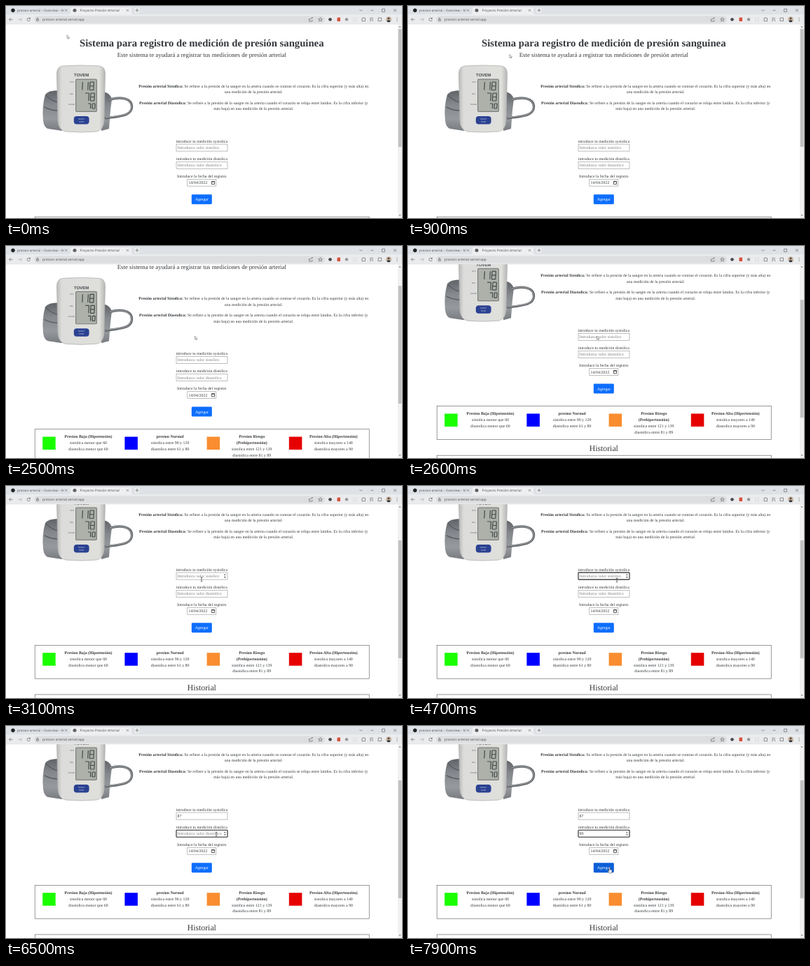
An HTML page that plays this animation: 565x304 px, repeating every 8 s.

```html
<!DOCTYPE html>
<html lang="es">
<head>
<meta charset="utf-8">
<title>Proyecto Presión Arterial</title>
<style>
html, body { margin: 0; width: 100%; height: 100%; overflow: hidden; background: #fff; }
svg { display: block; width: 100vw; height: 100vh; }
text { text-rendering: geometricPrecision; }
.page text { font: 5.885px "Liberation Serif", serif; fill: #34383c; }
.page .h1 { font-size: 14.71px; font-weight: bold; }
.page .h2 { font-size: 11.77px; }
.page .h3 { font-size: 8.83px; }
.page .b, .page .b tspan { font-weight: bold; }
.page .hint { fill: #808080; }
.page .white { fill: #fff; }
.page .tiny { font: 2.8px "Liberation Sans", sans-serif; fill: #556; }
.page .white.tiny { fill: #dde; }
.page .brand { font: bold 6px "Liberation Sans", sans-serif; fill: #44474b; }
.ui text { font: 4.85px "Noto Sans", sans-serif; fill: #55585c; }
.ui .tab { font-size: 4.6px; }
.ui path { fill: none; stroke: #6c6f73; stroke-width: .75; }
</style>
</head>
<body>
<svg viewBox="0 0 565 304" preserveAspectRatio="none">
  <defs>
    <clipPath id="view"><path d="M0 26H565V304H0z"/></clipPath>
    <linearGradient id="shell"><stop stop-color="#b9bab9"/><stop offset=".1" stop-color="#dcdcda"/><stop offset=".88" stop-color="#dfdfdc"/><stop offset="1" stop-color="#b4b5b4"/></linearGradient>
    <linearGradient id="cuff" x2="0" y2="1"><stop stop-color="#5f6266"/><stop offset=".35" stop-color="#85888d"/><stop offset=".7" stop-color="#96999d"/><stop offset="1" stop-color="#777a7f"/></linearGradient>
  </defs>
  <rect width="565" height="304" fill="#fff"/>
  <g clip-path="url(#view)"><g class="page" id="page">
    <g id="device">
      <path d="M75 121Q60 121 56 127Q51 144 53 164Q54 174 60 176L80 179Z" fill="url(#cuff)"/>
      <path d="M57 128Q66 137 75 138M55 145Q64 150 75 150" fill="none" stroke="#5c5f64" stroke-width="1.5"/>
      <path d="M138 123Q148 124 151 133L149 150 147 176 136 179Z" fill="url(#cuff)"/>
      <path d="M146 135C163 129 180 132 179.500 145S162 158 141 161" fill="none" stroke="#6a6d70" stroke-width="3.4"/>
      <path d="M147 134.500C163 129 179 132 178.800 145S162 157 142 160" fill="none" stroke="#a2a4a6" stroke-width="1"/>
      <path d="M81 86Q107 84 133 86Q141 87 141.500 96L140 165Q139 178 129 180Q107 182 85 180Q75 178 74 165L72.500 96Q73 87 81 86Z" fill="url(#shell)" stroke="#b0b1b0" stroke-width=".8"/>
      <text class="brand" x="107.700" y="101.300" text-anchor="middle">TOVEM</text>
      <rect x="99" y="104.500" width="31" height="47.500" rx="2" fill="#7d817f"/>
      <rect x="100.200" y="105.700" width="28.600" height="45.100" rx="1" fill="#adb1aa"/>
      <text class="tiny" x="91" y="110">SYS</text><text class="tiny" x="91" y="127">DIA</text><text class="tiny" x="89" y="142">PULSE</text>
      <rect x="96.800" y="158" width="21.800" height="11.500" rx="4" fill="#2b4292"/>
      <text class="tiny white" x="107.700" y="163" text-anchor="middle">START</text>
      <text class="tiny white" x="107.700" y="166.500" text-anchor="middle">STOP</text>
    </g>
  </g></g>
  <g class="ui" id="ui">
    <rect width="565" height="12.500" fill="#dee1e6"/>
    <path d="M90 12.500Q92 12 92 9V4Q92 2 94 2H177Q179 2 179 4V9Q179 12 181 12.500Z" style="fill:#eeeff0;stroke:none"/>
    <rect y="12.500" width="565" height="13.500" fill="#eaebec"/>
    <path d="M0 26H565" style="stroke:#dcdee1;stroke-width:.6"/>
    <rect x="40" y="14.200" width="415" height="10.300" rx="5.100" fill="#dddedf"/>
    <circle cx="10" cy="6.300" r="2.700" fill="#222"/>
    <circle cx="98" cy="6.300" r="2.500" fill="#5f6368"/>
    <circle cx="187" cy="6.300" r="4.300" fill="#eceded"/>
    <text class="tab" x="16" y="8">presion-arterial – Overview – N</text>
    <text x="105.500" y="8">Proyecto Presión Arterial</text>
    <text x="52" y="21">presion-arterial.vercel.app</text>
    <path d="M84 4.700l3 3m0-3l-3 3M172 4.700l3 3m0-3l-3 3M184.500 6.200h5m-2.500-2.500v5M504.500 5.200l2 2 2-2M520.500 6.200h4M536.500 4.200h4v4h-4zM553 4.200l4 4m0-4l-4 4"/>
    <path d="M9.500 19.300h-5m2.200-2.200l-2.200 2.200 2.200 2.200M34 17.800a2.300 2.300 0 1 0 .5 2.200m0-3.500v2h-2"/>
    <path d="M17.500 19.300h5m-2.200-2.200l2.200 2.200-2.200 2.200" style="stroke:#a9abad"/>
    <path d="M43.700 19h2.600v2.300h-2.600zM44.200 19v-1a.8.8 0 0 1 1.600 0v1M432.500 18v4h4.500v-2M434 20q0-3 3.500-3l-1-1m1 1l-1 1M448.500 16.500l.8 1.900 2 .2-1.500 1.300.5 2-1.800-1.100-1.800 1.100.5-2-1.500-1.300 2-.2z"/>
    <circle cx="462.500" cy="19.300" r="2.400" fill="#4a4e55"/>
    <rect x="472.500" y="16.500" width="4.500" height="5.500" fill="#d5533f"/>
    <circle cx="486" cy="19.300" r="2.200" fill="#94979b"/>
    <path d="M495.500 17h4.500v4.500h-4.500z" style="stroke:#d5d6d8"/>
    <path d="M508 17.500h1.200a1 1 0 0 1 2 0h1.300v4.200h-4.500zM519 17.300h5m-5 2h3m-3 2h2M523.300 19v3M531 17h4.500v4.500h-4.500z"/>
    <circle cx="546" cy="19.300" r="4" fill="#c6b7a5"/>
    <circle cx="546" cy="17.700" r="1.500" fill="#5e4638"/>
    <path d="M543.300 22q2.700-4.200 5.400 0a4 4 0 0 1-5.400 0" style="fill:#34383f;stroke:none"/>
    <path d="M558 16.700v1m0 1.100v1m0 1.100v1" style="stroke-width:1"/>
  </g>
  <rect x="559" y="26" width="6" height="278" fill="#f1f1f1"/>
  <path d="M560.500 30.500l1.500-1.800 1.500 1.800zM560.500 299.500l1.500 1.800 1.500-1.800z" fill="#707070"/>
  <rect id="thumb" x="559.700" width="4.800" height="169" fill="#c1c1c1"/>
  <g stroke-width=".5" stroke-linejoin="round">
    <path id="arrow" d="M0 0V5L1.200 4 2 5.800 2.800 5.400 2 3.700H3.600Z" fill="#fff" stroke="#555"/>
    <path id="beam" d="M-1.300-3Q0-3 0-2.300Q0-3 1.300-3M0-2.300V2.300M-1.300 3Q0 3 0 2.300Q0 3 1.300 3" fill="none" stroke="#333" stroke-width=".7"/>
    <path id="hand" d="M-.7 3V-2.500Q0-3.500.7-2.500V0L3 .6Q3.800 1 3.500 2.200L2.800 5H-.5L-2.700 2Q-2.400.8-.7 2.200" fill="#fff" stroke="#333"/>
  </g>
</svg>
<script>
const LOOP = 8000, SCROLL = 74;
const $ = id => document.getElementById(id);
const page = $('page');

function add(tag, attrs, parent = page) {
  const el = document.createElementNS('http://www.w3.org/2000/svg', tag);
  for (const k in attrs) el.setAttribute(k, attrs[k]);
  return parent.appendChild(el);
}
function label(x, y, str, cls = '', anchor = 'middle') {
  const el = add('text', { x, y, class: cls, 'text-anchor': anchor });
  el.textContent = str;
  return el;
}
const BORDER = '#929292';
const box = (x, y, width, height, stroke = BORDER) =>
  add('rect', { x, y, width, height, fill: '#fff', stroke, 'stroke-width': .6 });

// Seven-segment digits of the monitor: bits run a to g
function digits(str, x, y, w, h) {
  const codes = { 0: 63, 1: 6, 7: 7, 8: 127 };
  const m = h / 2;
  const segs = [`M0 0H${w}`, `M${w} 0V${m}`, `M${w} ${m}V${h}`, `M0 ${h}H${w}`, `M0 ${m}V${h}`, `M0 0V${m}`, `M0 ${m}H${w}`];
  [...str].forEach((c, i) => add('path', {
    d: segs.filter((s, n) => codes[c] >> n & 1).join(''), fill: 'none', stroke: '#454a4b', 'stroke-width': 1.2,
    transform: `translate(${x + i * (w + 2.6)} ${y}) skewX(-3)`
  }, $('device')));
}
digits('118', 104, 109, 5.4, 11.5);
digits('78', 113, 125, 5.4, 11);
digits('70', 117, 140, 3.8, 7);

label(279.3, 58, 'Sistema para registro de medición de presión sanguinea', 'h1');
label(279.3, 73, 'Este sistema te ayudará a registrar tus mediciones de presión arterial', 'h3');

function definition(y, term, first, second) {
  const el = label(353.3, y, '');
  const bold = add('tspan', { 'font-weight': 'bold' }, el);
  bold.textContent = term;
  el.append(' ' + first);
  label(353.3, y + 8.8, second);
}
definition(116.6, 'Presión arterial Sistolica:',
  'Se refiere a la presión de la sangre en la arteria cuando se contrae el corazón. Es la cifra superior (y más alta) en',
  'una medición de la presión arterial.');
definition(140.5, 'Presión arterial Diastolica:',
  'Se refiere a la presión de la sangre en la arteria cuando el corazón se relaja entre latidos. Es la cifra inferior (y',
  'más baja) en una medición de la presión arterial.');

function field(y, title, hint) {
  label(279.3, y - 2.4, title);
  const frame = box(243, y, 73, 10);
  const text = label(244.6, y + 6.9, hint, 'hint', 'start');
  const spin = add('path', { d: `M310.800 ${y + 4}l1.500-1.800 1.500 1.800zM310.800 ${y + 6}l1.500 1.800 1.500-1.800z`, fill: '#555' });
  return (value, focus, hover) => {
    text.textContent = value || hint;
    text.setAttribute('class', value ? '' : 'hint');
    frame.setAttribute('stroke', focus ? '#222' : BORDER);
    frame.setAttribute('stroke-width', focus ? 1.1 : .6);
    frame.setAttribute('rx', focus ? .8 : 0);
    spin.style.display = focus || hover ? '' : 'none';
  };
}
const systolic = field(198.1, 'introduce tu medición systolica', 'Introduzca valor sistolico');
const diastolic = field(223.3, 'introduce tu medición distolica', 'Introduzca valor diastolico');

label(279.3, 245.7, 'Introduce la fecha del registro');
box(258.8, 248.4, 41, 9.8);
label(260.6, 255.4, '14/04/2022', '', 'start');
add('path', { d: 'M293.500 251.300h4v4.300h-4zM293.500 252h4', fill: 'none', stroke: '#333', 'stroke-width': .8 });

const button = add('rect', { x: 264.8, y: 270.2, width: 29, height: 14, rx: 1.4 });
label(279.3, 279.3, 'Agregar', 'white');

box(41.2, 302.4, 477, 47.8, '#555');
const levels = [
  ['#1aff00', 'Presion Baja (Hipotensión)', 'sistolica menor que 60', 'diastolica menor que 60'],
  ['#0000ff', 'presion Normal', 'sistolica entre 90 y 120', 'diastolica entre 61 y 80'],
  ['#f98d2f', 'Presion Riesgo', '(Prehipertensión)', 'sistolica entre 121 y 139', 'diastolica entre 81 y 89'],
  ['#e60000', 'Presion Alta (Hipertensión)', 'sistolica mayores a 140', 'diastolica mayores a 90']
];
levels.forEach(([fill, ...rows], i) => {
  const x = 52.2 + i * 117.2;
  add('rect', { x, y: 313.2, width: 18.5, height: 18.5, fill });
  rows.forEach((row, n) => label(117.5 + i * 116.6, 315 + n * 8.83, row, n < rows.length - 2 ? 'b' : ''));
});
label(279.3, 367, 'Historial', 'h2');
box(41.2, 373, 477, 60, '#555');

// Cursor stops: time, x, y
const stops = [
  [0, 87, 41.5], [300, 87, 41.5], [1900, 269.5, 129], [2700, 269.5, 129], [3000, 279, 134],
  [3600, 279, 134], [4200, 298, 135], [5700, 298, 135], [6100, 300, 155], [7200, 300, 155], [7600, 287.5, 206], [LOOP, 287.5, 206]
];
const smooth = (t, a, b) => {
  const u = Math.min(1, Math.max(0, (t - a) / (b - a)));
  return u * u * (3 - 2 * u);
};
function cursorAt(t) {
  const i = stops.findIndex(s => s[0] > t);
  const [a, x0, y0] = stops[i - 1], [b, x1, y1] = stops[i];
  const u = smooth(t, a, b);
  return [x0 + (x1 - x0) * u, y0 + (y1 - y0) * u];
}
const typed = (t, str, start, gap) => str.slice(0, t < start ? 0 : 1 + Math.floor((t - start) / gap));

function draw(t) {
  const scroll = SCROLL * smooth(t, 2370, 2620);
  page.setAttribute('transform', `translate(0 ${-scroll})`);
  $('thumb').setAttribute('y', 33 + scroll * .608);

  const [x, y] = cursorAt(t);
  const inside = (l, top, r, bottom) => x > l && x < r && y + scroll > top && y + scroll < bottom;
  // Hover follows the pointer only once the page has come to rest
  const resting = t > 2700;
  const over1 = resting && inside(270, 198, 316, 210), over2 = inside(243, 223, 316, 234);
  const overButton = inside(264, 270, 294, 284);
  systolic(typed(t, '87', 5200, 200), t >= 3400 && t < 6200, over1);
  diastolic(typed(t, '90', 6800, 200), t >= 6200, over2);
  button.setAttribute('fill', overButton ? '#0b5ed7' : '#0d6efd');

  const shape = over1 || over2 ? 'beam' : overButton ? 'hand' : 'arrow';
  for (const id of ['arrow', 'beam', 'hand']) {
    $(id).style.display = id === shape ? '' : 'none';
    $(id).setAttribute('transform', `translate(${x} ${y})`);
  }
}
const begin = performance.now();
function tick() {
  draw((performance.now() - begin) % LOOP);
  requestAnimationFrame(tick);
}
tick();
</script>
</body>
</html>
```
